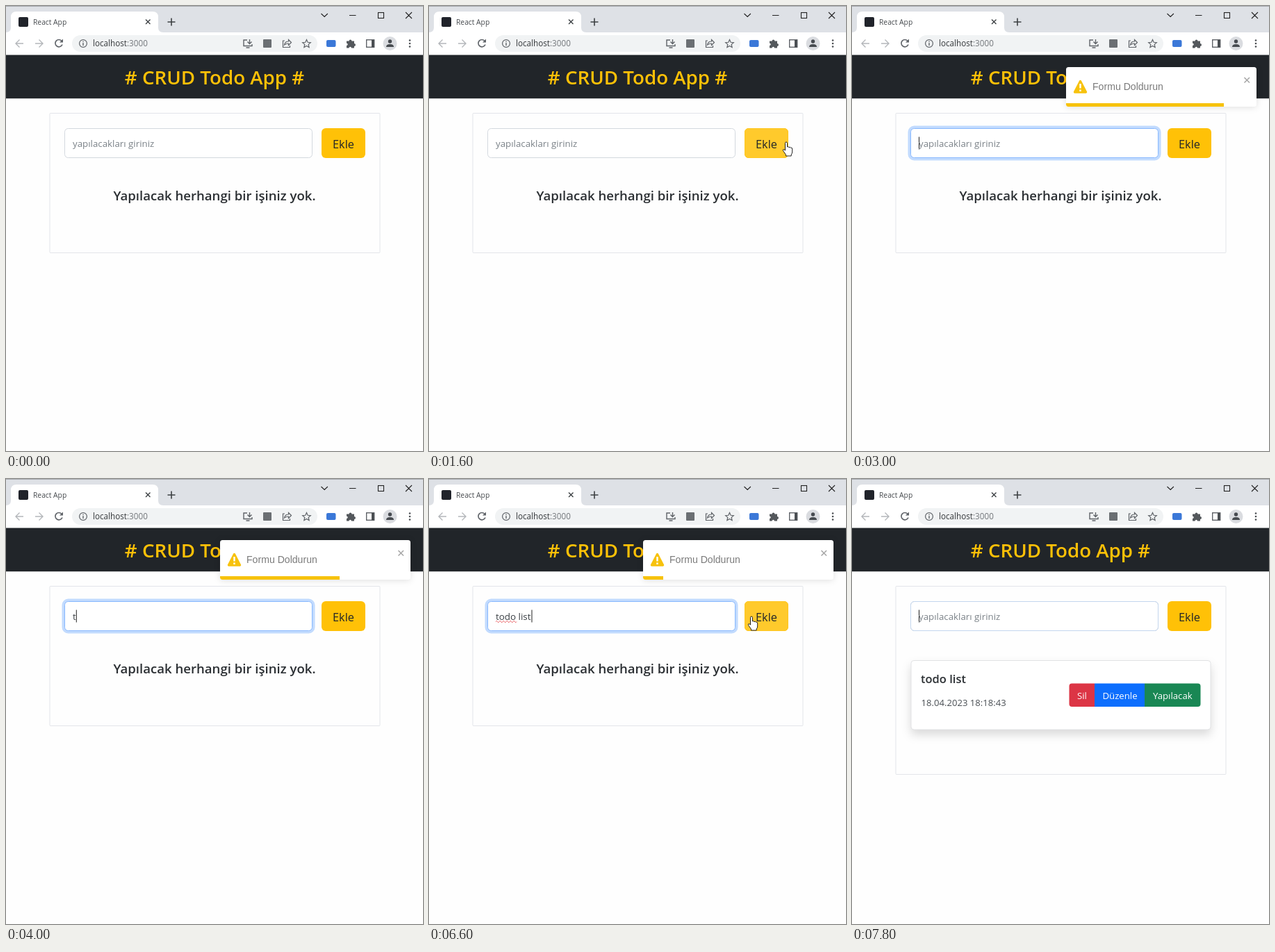
An HTML page for the animation above (8 s loop, 600 by 641 pixels).

```html
<!DOCTYPE html>
<html lang="tr">
<head>
<meta charset="utf-8">
<title>CRUD Todo App</title>
<style>
  html, body { margin: 0; width: 100%; height: 100%; overflow: hidden; background: #fff; }
  svg { display: block; width: 600px; height: 641px; font-family: "Open Sans", "Noto Sans", sans-serif; }
  text { white-space: pre; }
  .semi { font-weight: 600; }
  .line { fill: none; stroke: #5f6368; stroke-width: 1.4; }

  /* The screen refreshes five times a second: 200 ms = 2.5% */
  .a { animation: 8s step-end -8ms infinite both; }
  .pointer { animation-name: pointer; }
  .arrow { animation-name: arrow; }
  .hand { animation-name: hand; }
  .beam { animation-name: beam; }
  .focus { animation-name: focus; }
  .refocus { animation-name: refocus; }
  .hint { animation-name: hint; }
  .typing { animation-name: typing; }
  .caret { animation-name: caret; }
  .wavy { animation-name: wavy; }
  .empty { animation-name: empty; }
  .card { animation-name: card; }
  .box { animation-name: box; }
  .toast { animation-name: toast; }
  .bar { animation-name: bar; }

  @keyframes pointer {
    0%    { transform: translate(590px, 264px); }
    12.5% { transform: translate(575px, 250px); }
    15%   { transform: translate(556px, 232px); }
    17.5% { transform: translate(535px, 212px); }
    20%   { transform: translate(514px, 196px); }
    22.5% { transform: translate(496px, 197px); }
    25%   { transform: translate(490px, 197px); }
    30%   { transform: translate(470px, 198px); }
    32.5% { transform: translate(300px, 198px); }
    35%   { transform: translate(130px, 198px); }
    80%   { transform: translate(410px, 200px); }
    82.5% { transform: translate(464px, 198px); }
    85%   { transform: translate(480px, 197px); }
    87.5% { transform: translate(486px, 196px); }
    95%   { transform: translate(250px, 198px); }
  }
  @keyframes arrow { 0%, 20% { opacity: 0; } 10% { opacity: 1; } }
  @keyframes hand { 0%, 32.5%, 95% { opacity: 0; } 20%, 82.5% { opacity: 1; } }
  @keyframes beam { 0%, 37.5%, 82.5%, 97.5% { opacity: 0; } 32.5%, 80%, 95% { opacity: 1; } }
  @keyframes focus { 0%, 92.5% { opacity: 0; } 35% { opacity: 1; } }
  @keyframes refocus { 0% { opacity: 0; } 97.5% { opacity: 1; } }
  @keyframes hint { 0%, 92.5% { opacity: 1; } 47.5% { opacity: 0; } }
  @keyframes typing {
    0%, 92.5% { transform: none; }
    47.5% { transform: translateX(4.8px); }
    55%   { transform: translateX(12.8px); }
    57.5% { transform: translateX(21px); }
    60%   { transform: translateX(29.2px); }
    62.5% { transform: translateX(32.6px); }
    67.5% { transform: translateX(36px); }
    70%   { transform: translateX(39.5px); }
    72.5% { transform: translateX(45.8px); }
    75%   { transform: translateX(51.5px); }
  }
  @keyframes caret { 0%, 42.5%, 77.5%, 85% { opacity: 0; } 37.5%, 45%, 80%, 97.5% { opacity: 1; } }
  @keyframes wavy { 0%, 85% { opacity: 0; } 62.5% { opacity: 1; } }
  @keyframes empty { 0% { opacity: 1; } 92.5% { opacity: 0; } }
  @keyframes card { 0% { opacity: 0; } 92.5% { opacity: 1; } }
  @keyframes box { 0% { height: 201px; } 92.5% { height: 271px; } }
  @keyframes toast {
    0%, 92.5% { transform: translateX(600px); }
    30%   { transform: translateX(116px); }
    32.5% { transform: translateX(2px); }
    35%   { transform: none; }
    90%   { transform: translateX(-11px); }
  }
  @keyframes bar {
    0%   { transform: translateX(-15px); }
    30%  { transform: translateX(-15px); animation-timing-function: steps(24, end); }
    90%  { transform: translateX(-279px); }
    100% { transform: translateX(-279px); }
  }
  .soft { filter: drop-shadow(0 1px 5px rgba(0, 0, 0, .12)); }
  .deep { filter: drop-shadow(0 7px 7px rgba(0, 0, 0, .15)); }
</style>
</head>
<body>
<svg viewBox="0 0 600 641">
  <defs>
    <clipPath id="panel"><rect x="308" y="88" width="274" height="57" rx="3.5"/></clipPath>
    <clipPath id="group"><rect x="312.5" y="294.5" width="189" height="33.5" rx="4"/></clipPath>
  </defs>
  <rect width="600" height="641" fill="#fefefe"/>

  <!-- Tab strip -->
  <rect width="600" height="38" fill="#dee1e6"/>
  <rect width="600" height="1" fill="#a9acb0"/>
  <path d="M0 38Q7 38 7 31V16Q7 8 15 8H211Q219 8 219 16V31Q219 38 226 38Z" fill="#fff"/>
  <rect x="18" y="16" width="14" height="14" rx="2" fill="#20232a"/>
  <text x="39" y="27" font-size="10.3" fill="#45494d">React App</text>
  <path class="line" d="M201 19.5l6.5 6.5m0-6.5l-6.5 6.5" style="stroke:#3c4043"/>
  <path class="line" d="M232.5 23H243.5M238 17.5V28.5" style="stroke:#3c4043;stroke-width:1.6"/>
  <g fill="none" stroke="#222" stroke-width="1.1">
    <path d="M453.5 11l4.7 4.5 4.7-4.5M494 13.5h9.5M575 9l9 9m0-9l-9 9"/>
    <rect x="535.5" y="9.5" width="8" height="8"/>
  </g>

  <!-- Toolbar -->
  <rect y="38" width="600" height="33" fill="#fff"/>
  <g class="line">
    <path d="M25 54H14m5.5-5.5L14 54l5.5 5.5M42 54H53m-5.5-5.5L53 54l-5.5 5.5" stroke="#b4b7ba"/>
    <path d="M80.3 50.5A5.2 5.2 0 1 0 81 55.5" stroke-width="1.6"/>
  </g>
  <path d="M82 47.5v5h-5z" fill="#5f6368"/>
  <rect x="95" y="42" width="353" height="24" rx="12" fill="#f1f3f4"/>
  <g class="line">
    <circle cx="111" cy="54" r="5.4" stroke-width="1.2"/>
    <path d="M111 53v4M111 50.7v1.3"/>
  </g>
  <text x="125" y="58.3" font-size="11.7" fill="#34373a">localhost<tspan fill="#74787c">:3000</tspan></text>
  <g class="line">
    <path d="M347 49h-5v8.5h12V55M345.5 60h5M350.5 48v6m-3-2.5l3 3 3-3"/>
    <path d="M401 50h-2.5v9.5h10V57M400.5 56q1-5 6-5v-2.5l4 4-4 4V54q-3.5 0-6 2z" stroke-width="1.2"/>
    <path d="M432.5 48.5l1.7 3.8 4.1.4-3.1 2.7.9 4.1-3.6-2.1-3.6 2.1.9-4.1-3.1-2.7 4.1-.4z" stroke-width="1.2"/>
    <rect x="518.7" y="48.7" width="11" height="10.6"/>
  </g>
  <rect x="370" y="48" width="12" height="12" rx="1" fill="#6b6f73"/>
  <rect x="461" y="49" width="13.5" height="10" rx="2" fill="#3b78d8"/>
  <path d="M490 50.5h3.5a2 2 0 0 1 4 0h3.5v3.5a2 2 0 0 1 0 4v2.5h-4a1.7 1.7 0 0 0-3.4 0H490V57a1.7 1.7 0 0 0 0-3.4z" fill="#54585c"/>
  <rect x="526" y="49" width="4" height="10.5" fill="#4b4f53"/>
  <circle cx="552.5" cy="54" r="10" fill="#dadce0"/>
  <circle cx="552.5" cy="51" r="2.7" fill="#474b50"/>
  <path d="M547 59q0-4 5.5-4t5.5 4z" fill="#474b50"/>
  <g fill="#4b4f53">
    <circle cx="581" cy="49.5" r="1.3"/><circle cx="581" cy="54" r="1.3"/><circle cx="581" cy="58.5" r="1.3"/>
  </g>

  <!-- Page -->
  <rect y="70.5" width="600" height="62.7" fill="#212529"/>
  <text class="semi" x="300" y="113" font-size="27.7" text-anchor="middle" fill="#ffc107"># CRUD Todo App #</text>
  <rect class="a box" x="63" y="154.5" width="475" height="201" rx="1" fill="none" stroke="#e3e5ea"/>

  <rect x="84.5" y="176.5" width="356" height="42" rx="5" fill="#fff" stroke="#d3d8de"/>
  <g class="a focus">
    <rect x="82.5" y="174.5" width="360" height="46" rx="7" fill="none" stroke="#c2dbfe" stroke-width="4"/>
    <rect x="84.5" y="176.5" width="356" height="42" rx="5" fill="#fff" stroke="#86b7fe"/>
  </g>
  <rect class="a refocus" x="84.5" y="176.5" width="356" height="42" rx="5" fill="none" stroke="#c3d6ee"/>
  <text x="96" y="203" font-size="13.4" fill="#3a3f44">todo list</text>
  <g class="a typing">
    <rect x="96" y="186" width="60" height="24" fill="#fff"/>
    <path class="a caret" d="M96.5 188.5V206.5" stroke="#222"/>
  </g>
  <path class="a wavy" d="M96 205.5q1.25-2.5 2.5 0t2.5 0 2.5 0 2.5 0 2.5 0 2.5 0 2.5 0 2.5 0 2.5 0 2.5 0 2.5 0 2.5 0" fill="none" stroke="#e5484d"/>
  <text class="a hint" x="96" y="203" font-size="13.3" fill="#7b8288">yapılacakları giriniz</text>

  <rect x="454" y="176" width="63" height="43" rx="6" fill="#ffc107"/>
  <rect class="a hand" x="454.5" y="176.5" width="62" height="42" rx="5.5" fill="#ffca2c" stroke="#ffc720"/>
  <text x="470" y="204.5" font-size="16.4" fill="#212529">Ekle</text>

  <text class="a empty semi" x="300" y="280" font-size="18.6" text-anchor="middle" fill="#2b2f33">Yapılacak herhangi bir işiniz yok.</text>

  <g class="a card">
    <rect class="deep" x="85" y="261.5" width="431" height="99.5" rx="4" fill="#fff"/>
    <rect x="85" y="261.5" width="431" height="99.5" rx="4" fill="none" stroke="#e1e2e4"/>
    <text class="semi" x="99" y="293.5" font-size="16.5" fill="#2b2f33">todo list</text>
    <text x="99.5" y="327" font-size="13.1" fill="#4a4f54">18.04.2023 18:18:43</text>
    <g clip-path="url(#group)">
      <rect x="312" y="294" width="37" height="35" fill="#dc3545"/>
      <rect x="349" y="294" width="72" height="35" fill="#0d6efd"/>
      <rect x="421" y="294" width="81" height="35" fill="#198754"/>
    </g>
    <g font-size="13.2" fill="#fff" text-anchor="middle">
      <text x="331" y="316.5">Sil</text>
      <text x="385.5" y="316.5">Düzenle</text>
      <text x="461.3" y="316.5">Yapılacak</text>
    </g>
  </g>

  <!-- Notification -->
  <g class="a toast">
    <rect class="soft" x="308" y="88" width="274" height="57" rx="3.5" fill="#fff"/>
    <path d="M328.5 108.5L336.5 124H320.5Z" fill="#f7c20c" stroke="#f7c20c" stroke-width="3.4" stroke-linejoin="round"/>
    <path d="M328.5 112V118.5M328.5 120.6V123" stroke="#fff" stroke-width="2.4"/>
    <text x="346" y="120.7" font-size="14.1" fill="#7a7a7a" style="font-family:'Liberation Sans',Arial,sans-serif">Formu Doldurun</text>
    <path d="M564.5 103l7.5 7.5m0-7.5l-7.5 7.5" stroke="#a5a5a5" stroke-width="1.5"/>
    <g clip-path="url(#panel)">
      <rect class="a bar" x="308" y="140" width="275" height="5" fill="#f7c20c"/>
    </g>
  </g>

  <!-- Mouse -->
  <g class="a pointer" stroke="#222" fill="#fff" stroke-linejoin="round">
    <path class="a arrow" d="M0 0V15.5l3.6-3.3 2.5 5.8 2.4-1-2.5-5.7h5z"/>
    <path class="a hand" d="M-1.5 12V1.5a1.5 1.5 0 0 1 3 0V7q1.2-1 2.5.6 1.3-.9 2.4.5 2.3-.5 2.3 1.9v4q0 2.5-1.5 4v2H-.5v-1.8L-4.5 12.5q-.8-2.2 1.3-1.8z"/>
    <path class="a beam" fill="none" d="M-3-8q3 0 3 2V6q0 2 3 2M3-8q-3 0-3 2M0 6q0 2-3 2"/>
  </g>
</svg>
</body>
</html>
```
